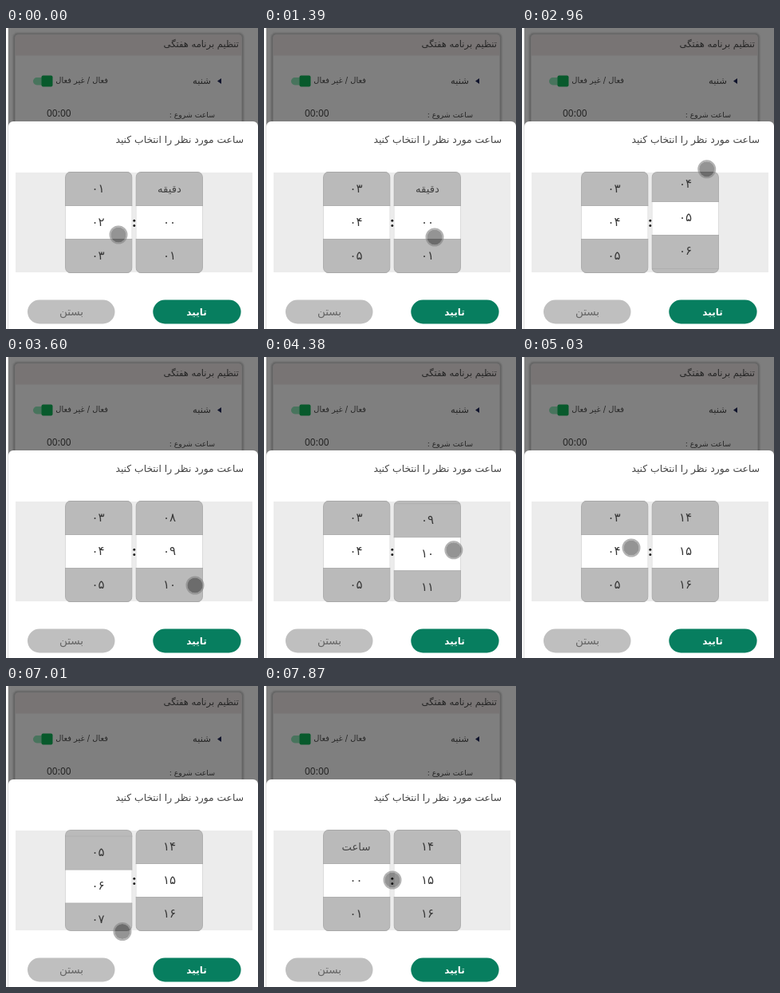
These frames come from a looping animation (316x377 px, 7990 ms). An HTML page:

```html
<!DOCTYPE html>
<html lang="fa">
<head>
<meta charset="utf-8">
<title>Time picker</title>
<style>
  html, body { margin: 0; width: 100%; height: 100%; overflow: hidden; background: #fff; }
  svg { display: block; width: 316px; height: 377px; }
  text { font-family: "DejaVu Sans", sans-serif; fill: #444; }
  .rtl { direction: rtl; }
  .mid { text-anchor: middle; }
  .dim { fill: #262626; }
  .latin { font-family: "Noto Sans", sans-serif; }
  .row rect { fill: #bababa; }
  .row.on rect { fill: #fff; }
  .num { font-size: 15px; fill: #383838; }
  .word { font-size: 13.2px; }
</style>
</head>
<body>
<svg viewBox="0 0 316 377">
  <defs>
    <filter id="soft" x="-10%" y="-10%" width="120%" height="120%"><feGaussianBlur stdDeviation="1.2"/></filter>
    <clipPath id="hourClip"><rect x="74" y="180" width="84.5" height="127" rx="7"/></clipPath>
    <clipPath id="minuteClip"><rect x="162.5" y="180" width="84.5" height="127" rx="7"/></clipPath>
  </defs>

  <!-- dimmed page -->
  <rect x="3" width="313" height="130" fill="#7e7e7e"/>
  <rect x="10.5" y="7.5" width="286" height="130" rx="4" fill="none" stroke="#565656" stroke-width="2.2" filter="url(#soft)"/>
  <rect x="11.5" y="8.5" width="284" height="130" rx="4" fill="#7f7f7f"/>
  <path d="M11.500 34.500V12.500a4 4 0 0 1 4-4h276a4 4 0 0 1 4 4v22z" fill="#787474"/>
  <text class="rtl dim" x="292" y="24" font-size="11.5">تنظیم برنامه هفتگی</text>
  <path d="M270 63v7l-5-3.500z" fill="#10142c"/>
  <text class="rtl dim" x="257" y="70" font-size="11.6">شنبه</text>
  <text class="rtl dim" x="128" y="69" font-size="9.9">فعال / غیر فعال</text>
  <rect x="34" y="62" width="24" height="9.5" rx="4.7" fill="#48745d"/>
  <rect x="44.5" y="59.5" width="14" height="14" rx="2" fill="#085a2c"/>
  <text class="rtl dim" x="262" y="112" font-size="9.3">ساعت شروع :</text>
  <text class="dim latin" x="51" y="111" font-size="12">00:00</text>

  <!-- sheet -->
  <path d="M3 377V123a6 6 0 0 1 6-6H310a6 6 0 0 1 6 6V377z" fill="#fff"/>
  <path d="M2.5 0V377" stroke="#dedede"/>
  <text class="rtl" x="298" y="144" font-size="12.3">ساعت مورد نظر را انتخاب کنید</text>
  <rect x="12" y="181" width="297" height="125" fill="#ececec"/>
  <g id="hours" clip-path="url(#hourClip)"></g>
  <g id="minutes" clip-path="url(#minuteClip)"></g>
  <g fill="#222"><circle cx="160.8" cy="241.3" r="1.5"/><circle cx="160.8" cy="247.5" r="1.5"/></g>

  <rect x="27" y="340.5" width="109.5" height="30" rx="15" fill="#bfbfbf"/>
  <text class="rtl mid" x="82" y="359.5" font-size="13.5" style="fill:#666">بستن</text>
  <rect x="184.300" y="340.5" width="110.300" height="30" rx="15" fill="#077e5f"/>
  <text class="rtl mid" x="239" y="359.5" font-size="12" font-weight="700" style="fill:#fff">تایید</text>

  <g id="touch">
    <circle r="9.6" fill-opacity=".42"/>
    <circle r="10.5" fill="none" stroke="#808080" stroke-opacity=".6" stroke-width="2"/>
  </g>
</svg>
<script>
const LOOP = 7990, FRAME = LOOP / 64, ROW = 42;
const START = { touch: [141, 259], hour: 2, minute: 0 };

// Each gesture goes from where the touch rests over "via" to a new rest;
// a flick also brings its wheel to the value "to".
const gestures = [
  { start: 130,  turn: 640,  end: 1360, via: [141, 167], rest: [214, 262], wheel: "hour", to: 4 },
  { start: 1640, turn: 1900, end: 2240, via: [222, 171], rest: [228, 283], wheel: "minute", to: 4 },
  { start: 2690, turn: 2960, end: 3480, via: [233, 141], rest: [237, 286], wheel: "minute", to: 9 },
  { start: 4230, turn: 4620, end: 4980, via: [240, 135], rest: [137, 239], wheel: "minute", to: 15 },
  { start: 5000, turn: 5270, end: 5660, via: [139, 155], rest: [174, 317], wheel: "hour", to: 6 },
  { start: 5660, turn: 5990, end: 6110, via: [138, 222], rest: [137, 243] },
  { start: 6140, turn: 6400, end: 6600, via: [149, 169], rest: [133, 250], wheel: "hour", to: 8 },
  { start: 6860, turn: 7130, end: 7370, via: [160, 370], rest: [195, 245], wheel: "hour", to: 0 },
  { start: 7370, turn: 7630, end: 7860, via: [136, 226], rest: [161, 243] }
];

const byId = id => document.getElementById(id);
const persian = n => String(n).padStart(2, "0")
  .replace(/\d/g, d => String.fromCharCode(0x6f0 + Number(d)));
const mix = (a, b, k) => a + (b - a) * k;

function ease(t, from, to) {
  const k = Math.min(1, Math.max(0, (t - from) / (to - from)));
  return k * k * (3 - 2 * k);
}

function add(parent, tag, attrs, label = "") {
  const el = document.createElementNS("http://www.w3.org/2000/svg", tag);
  for (const key in attrs) el.setAttribute(key, attrs[key]);
  el.textContent = label;
  return parent.appendChild(el);
}

function makeWheel(id, x, middle, heading, count) {
  const strip = add(byId(id), "g", {});
  const rows = [];
  for (let n = -1; n < count; n++) {
    const top = 222.5 + n * ROW;
    const isWord = n < 0;
    const row = add(strip, "g", { class: "row" });
    add(row, "rect", { x, y: top, width: 84.5, height: ROW + 0.5 });
    add(row, "path", { d: `M${x} ${top}h84.5`, stroke: "#b0b0b0" });
    add(row, "text", {
      class: isWord ? "rtl mid word" : "mid num", x: middle, y: top + 25
    }, isWord ? heading : persian(n));
    rows.push(row);
  }
  add(byId(id), "rect", {
    x: x + 0.5, y: 180.5, width: 83.5, height: 126, rx: 6.5, fill: "none", stroke: "#999", "stroke-opacity": 0.35
  });
  return value => {
    strip.setAttribute("transform", `translate(0 ${-value * ROW})`);
    const chosen = Math.round(value) + 1;
    rows.forEach((row, i) => row.classList.toggle("on", i === chosen));
  };
}

function poseAt(t) {
  const pose = { ...START };
  for (const g of gestures) {
    if (t < g.start) break;
    const out = ease(t, g.start, g.turn);
    const back = ease(t, g.turn, g.end);
    pose.touch = pose.touch.map((v, i) => mix(mix(v, g.via[i], out), g.rest[i], back));
    // The wheel settles before the touch comes to rest.
    if (g.wheel) pose[g.wheel] = mix(pose[g.wheel], g.to, ease(t, g.start, mix(g.start, g.end, 0.75)));
  }
  return pose;
}

const setHour = makeWheel("hours", 74, 115.5, "ساعت", 24);
const setMinute = makeWheel("minutes", 162.5, 205, "دقیقه", 60);
const touch = byId("touch");

function draw() {
  const t = performance.now() % LOOP;
  const pose = poseAt(Math.floor(t / FRAME) * FRAME);
  touch.setAttribute("transform", `translate(${pose.touch})`);
  setHour(pose.hour);
  setMinute(pose.minute);
  requestAnimationFrame(draw);
}
draw();
</script>
</body>
</html>
```
